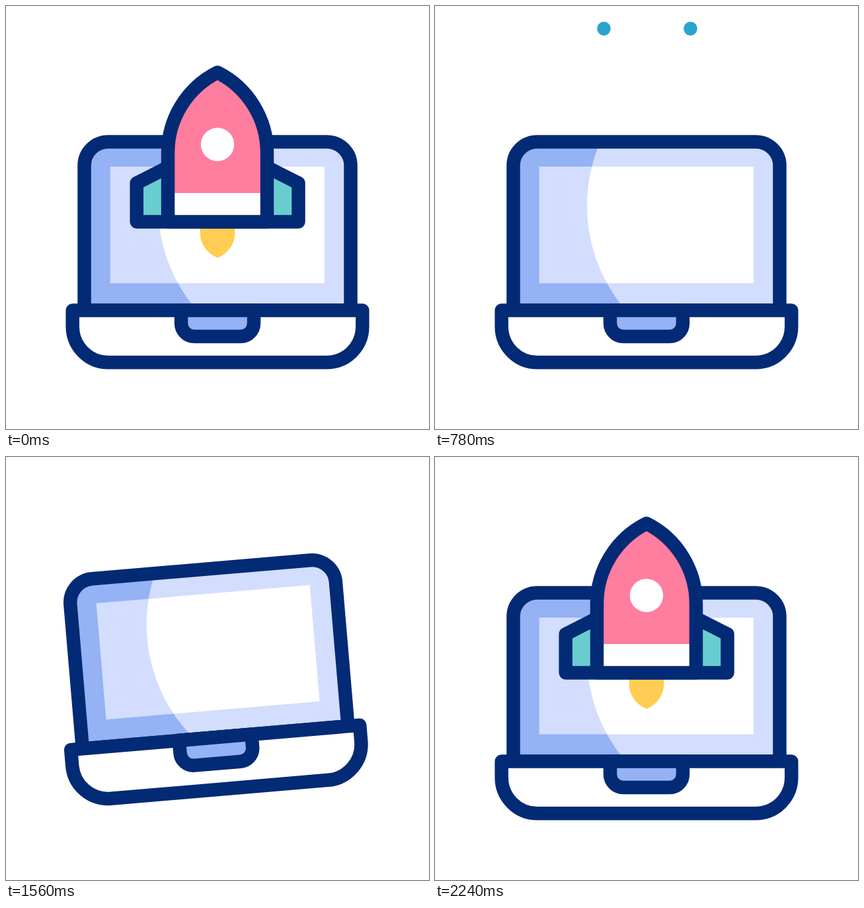
Animation of 640 by 640 pixels, one loop 2.4 s. Source, as an HTML page:

```html
<!DOCTYPE html>
<html lang="en">
<head>
<meta charset="utf-8">
<title>Laptop rocket launch</title>
<style>
  html, body { margin: 0; width: 100%; height: 100%; overflow: hidden; background: #fff; }
  svg { display: block; width: 100%; height: 100%; }
  .line { stroke: #032a75; stroke-width: 20.5; stroke-linejoin: round; }
  .streak { stroke: #2aa4cf; stroke-width: 20.5; stroke-linecap: round; }
  .pale { fill: #d3ddfd; }
  .mid { fill: #94b2f4; }
  .white { fill: #fff; }
</style>
</head>
<body>
<svg viewBox="0 0 640 640">
  <defs>
    <clipPath id="glare"><circle cx="474" cy="302" r="244"/></clipPath>
    <clipPath id="above"><rect y="-20" width="640" height="439.5"/></clipPath>
    <path id="lid" d="M118.5 460.5V241.5a36 36 0 0 1 36-36H485.500a36 36 0 0 1 36 36V460.500Z"/>
    <path id="screen" d="M157.700 243H482V419.500H157.700Z"/>
  </defs>

  <g id="laptop">
    <use href="#lid" class="mid"/>
    <use href="#screen" class="pale"/>
    <g clip-path="url(#glare)">
      <use href="#lid" class="pale"/>
      <use href="#screen" class="white"/>
    </g>
    <use href="#lid" class="line" fill="none"/>
    <path class="line white" d="M100.700 460.500H539.300V485a54.300 54.300 0 0 1-54.300 54.300H155a54.300 54.300 0 0 1-54.300-54.300Z"/>
    <path class="line mid" d="M265 460.500V480a20 20 0 0 0 20 20H355a20 20 0 0 0 20-20V460.500Z"/>
  </g>

  <g id="streaks"></g>

  <g clip-path="url(#above)">
    <g id="rocket">
      <path fill="#ffcd52" d="M293.700 328V343C293.700 361 305 375 320 381C335 375 346.300 361 346.300 343V328Z"/>
      <path class="line" fill="#69cdd0" d="M245 244L197.700 268V326.500H442.500V268L395 244Z"/>
      <path fill="#ff7d9f" d="M245 326.500V222A135.900 135.900 0 0 1 320 100.500A135.900 135.900 0 0 1 395 222V326.500Z"/>
      <rect class="white" x="250" y="283" width="140" height="40"/>
      <circle class="white" cx="320" cy="209.500" r="25.200"/>
      <path class="line" fill="none" d="M245 326.500V222A135.900 135.900 0 0 1 320 100.500A135.900 135.900 0 0 1 395 222V326.500Z"/>
    </g>
  </g>
</svg>
<script>
  const LOOP = 2400, STEP = 20;
  const byId = id => document.getElementById(id);
  const laptop = byId('laptop'), rocket = byId('rocket');

  const span = (t, a, b) => Math.min(1, Math.max(0, (t - a) / (b - a)));
  const inOut = p => (1 - Math.cos(Math.PI * p)) / 2;
  const out = p => Math.sin(Math.PI * p / 2);

  // keys: [time, value] pairs, eased between neighbours
  function track(keys, t) {
    let v = keys[0][1];
    for (let i = 1; i < keys.length; i++) {
      v += (keys[i][1] - keys[i - 1][1]) * inOut(span(t, keys[i - 1][0], keys[i][0]));
    }
    return v;
  }

  const TILT = [[780, 0], [993, -5], [1262, 5], [1531, -5], [1800, 0]];
  const LIFT = [[780, 0], [1052, -36.5], [1305, 36.5], [1550, -36.5], [1800, 0]];

  const STREAKS = [
    { xs: [255.5, 386.5], from: 369.7, to: 34, head: [220, 685], tail: [300, 792] },
    { xs: [210.8, 431], from: 337, to: 77, head: [240, 757], tail: [300, 772] }
  ];
  for (const s of STREAKS) {
    s.lines = s.xs.map(x => {
      const el = document.createElementNS('http://www.w3.org/2000/svg', 'line');
      el.setAttribute('class', 'streak');
      el.setAttribute('x1', x);
      el.setAttribute('x2', x);
      return byId('streaks').appendChild(el);
    });
  }

  const show = (el, on) => el.setAttribute('visibility', on ? 'visible' : 'hidden');

  function drawStreak(s, t) {
    const at = range => s.from + (s.to - s.from) * inOut(span(t, ...range));
    for (const el of s.lines) {
      show(el, t > s.head[0] && t < s.tail[1]);
      el.setAttribute('y1', at(s.head));
      el.setAttribute('y2', at(s.tail));
    }
  }

  function draw(t) {
    let x = 0, y;
    if (t < 1000) {
      y = -440 * inOut(span(t, 206, 740));
    } else {
      const left = 1 - out(span(t, 1860, 2240));
      x = 5.9 * left;
      y = 338 * left;
    }
    show(rocket, t < 740 || t > 1860);
    rocket.setAttribute('transform', `translate(${x} ${y})`);
    laptop.setAttribute('transform',
      `translate(0 ${track(LIFT, t)}) rotate(${track(TILT, t)} 320 500)`);
    STREAKS.forEach(s => drawStreak(s, t));
  }

  const start = performance.now();
  function frame() {
    const t = (performance.now() - start) % LOOP;
    draw(Math.floor(t / STEP) * STEP);
    requestAnimationFrame(frame);
  }
  frame();
</script>
</body>
</html>
```
